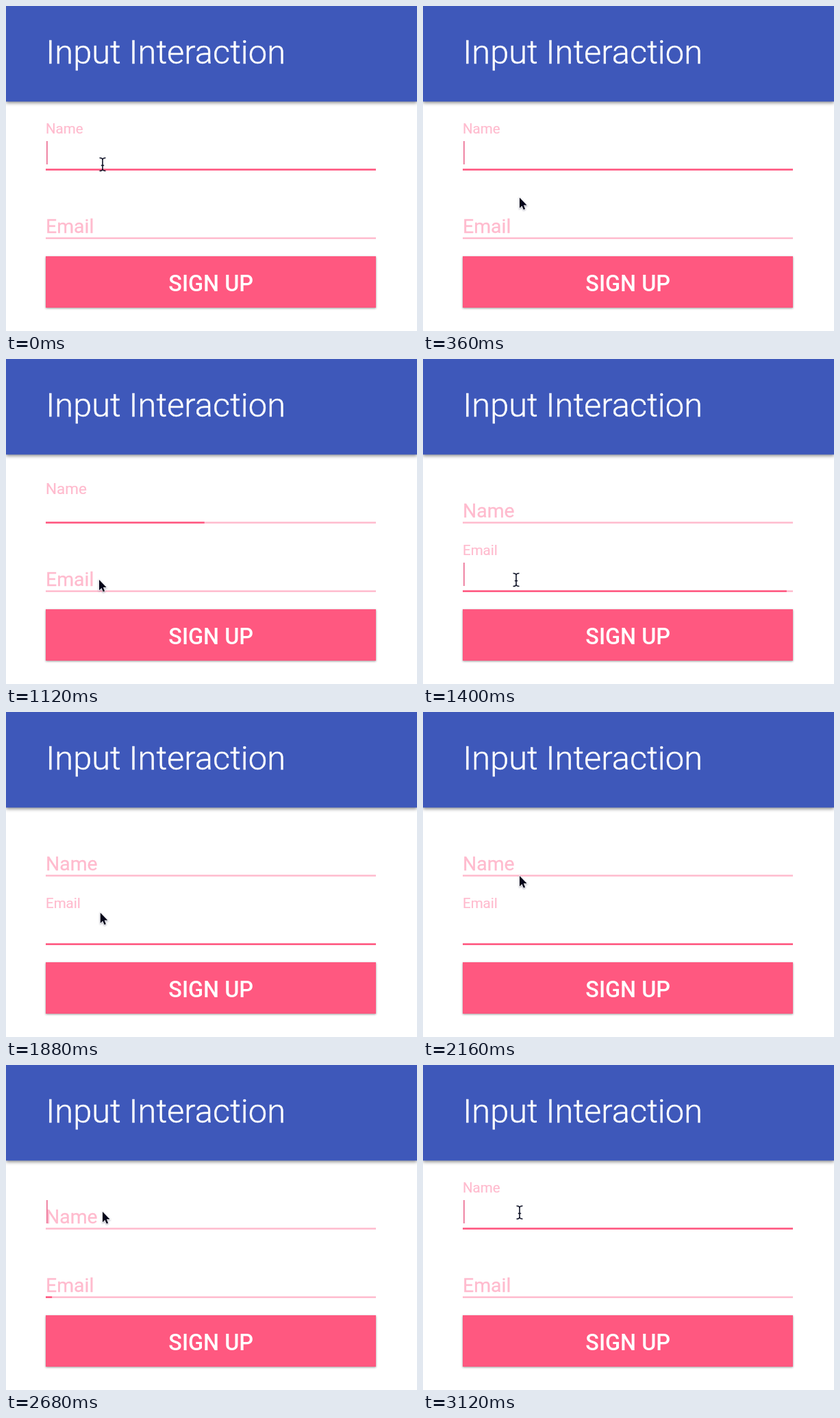
Animation, 600 px wide and 474 px high, one loop 3.2 s. Source, as an HTML page:

```html
<!DOCTYPE html>
<html lang="en">
<head>
<meta charset="utf-8">
<title>Input Interaction</title>
<style>
  html, body { margin: 0; width: 100%; height: 100%; overflow: hidden; background: #fff; }
  svg { display: block; font-family: Roboto, sans-serif; }
  .header { fill: #3e58ba; filter: drop-shadow(0 2px 2.4px rgba(0, 0, 0, .45)); }
  .title { font-size: 48.8px; font-weight: 300; fill: #fff; stroke: #fff; stroke-width: .4; }
  .label { font-size: 28.4px; fill: #ffbbce; stroke: #ffbbce; stroke-width: .3; }
  .track { fill: #ffbbce; }
  .line { fill: #ff5880; }
  .caret { fill: #ec7095; }
  .button { fill: #ff5880; filter: drop-shadow(0 1px 1.4px rgba(0, 0, 0, .4)); }
  .caption { font-size: 32.4px; font-weight: 500; fill: #fff; text-anchor: middle; }
  #arrow { fill: #05051a; stroke: #fff; stroke-width: 1.4; paint-order: stroke; filter: drop-shadow(0 1px 1px rgba(0, 0, 40, .35)); }
  #beam { fill: none; stroke: #111428; stroke-width: 1.6; }
</style>
</head>
<body>
<svg width="600" height="474" viewBox="0 0 600 474">
  <rect class="header" width="600" height="139.4"/>
  <text class="title" x="58.3" y="84">Input Interaction</text>
  <g id="fields"></g>
  <rect class="button" x="58" y="365" width="482" height="75"/>
  <text class="caption" x="299.2" y="416">SIGN UP</text>
  <path id="arrow" d="M0 0V15.2L3.5 12L5.8 17.4L8.1 16.4L5.9 11H10.6Z"/>
  <path id="beam" d="M-4.5-9.5Q0-9.5 0-6.5Q0-9.5 4.5-9.5M0-7V7M-4.5 9.5Q0 9.5 0 6.5Q0 9.5 4.5 9.5M-2.2 1.5H2.2"/>
</svg>
<script>
const LOOP = 3200, STEP = 40, LINE_MS = 300, LABEL_MS = 200, SMALL = 20.5 / 28.4;

const clamp = x => Math.min(1, Math.max(0, x));
const easeOut = x => 1 - (1 - x) ** 3;
const smooth = x => x * x * (3 - 2 * x);
const within = (t, spans) => spans.some(([a, b]) => t >= a && t < b);

// shifts: [time, focused]; carets: spans in which the caret is lit
const fields = [
  { name: "Name", y: 0, shifts: [[-LOOP, 1], [1055, 0], [2680, 1]],
    carets: [[0, 480], [980, 1055], [2680, LOOP]] },
  { name: "Email", y: 100, shifts: [[-LOOP, 0], [1180, 1], [2460, 0]],
    carets: [[1180, 1680], [2180, 2460]] }
];

// pointer path: [time, x, y]
const path = [
  [40, 141, 231], [600, 141, 311], [720, 141, 311], [1000, 136, 322],
  [1720, 136, 322], [2120, 141, 239], [2160, 141, 239], [2400, 141, 214],
  [2760, 141, 214], [2920, 141, 215]
];
const beamSpans = [[0, 240], [1280, 1880], [2800, LOOP]];

const byId = id => document.getElementById(id);
byId("fields").innerHTML = fields.map(f => `
  <g transform="translate(0 ${f.y})">
    <rect class="track" x="58" y="237.4" width="482" height="2.5"/>
    <rect class="line" x="58" y="237.4" height="2.5"/>
    <text class="label">${f.name}</text>
    <rect class="caret" x="59" y="197" width="1.7" height="34"/>
  </g>`).join("");
fields.forEach((f, i) => {
  const g = byId("fields").children[i];
  for (const part of ["line", "label", "caret"]) f[part] = g.querySelector("." + part);
});

function focusAmount(field, t, ms, ease) {
  const [start, on] = field.shifts.findLast(s => s[0] <= t);
  const k = ease(clamp((t - start) / ms));
  return on ? k : 1 - k;
}

function pointerAt(t) {
  const i = path.findIndex(p => p[0] > t);
  if (i === 0) return path[0].slice(1);
  if (i < 0) return path.at(-1).slice(1);
  const [t0, x0, y0] = path[i - 1], [t1, x1, y1] = path[i];
  const k = smooth((t - t0) / (t1 - t0));
  return [x0 + (x1 - x0) * k, y0 + (y1 - y0) * k];
}

function draw(t) {
  for (const f of fields) {
    const up = focusAmount(f, t, LABEL_MS, smooth);
    f.line.setAttribute("width", 482 * focusAmount(f, t, LINE_MS, easeOut));
    f.label.setAttribute("transform",
      `translate(58 ${231.2 - 45.2 * up}) scale(${1 - (1 - SMALL) * up})`);
    f.caret.style.opacity = +within(t, f.carets);
  }
  const beam = within(t, beamSpans);
  const place = `translate(${pointerAt(t)})`;
  for (const id of ["arrow", "beam"]) {
    byId(id).setAttribute("transform", place);
    byId(id).style.opacity = +((id === "beam") === beam);
  }
}

const begin = performance.now();
function tick() {
  const t = (performance.now() - begin) % LOOP;
  draw(Math.floor(t / STEP) * STEP);
  requestAnimationFrame(tick);
}
tick();
</script>
</body>
</html>
```
